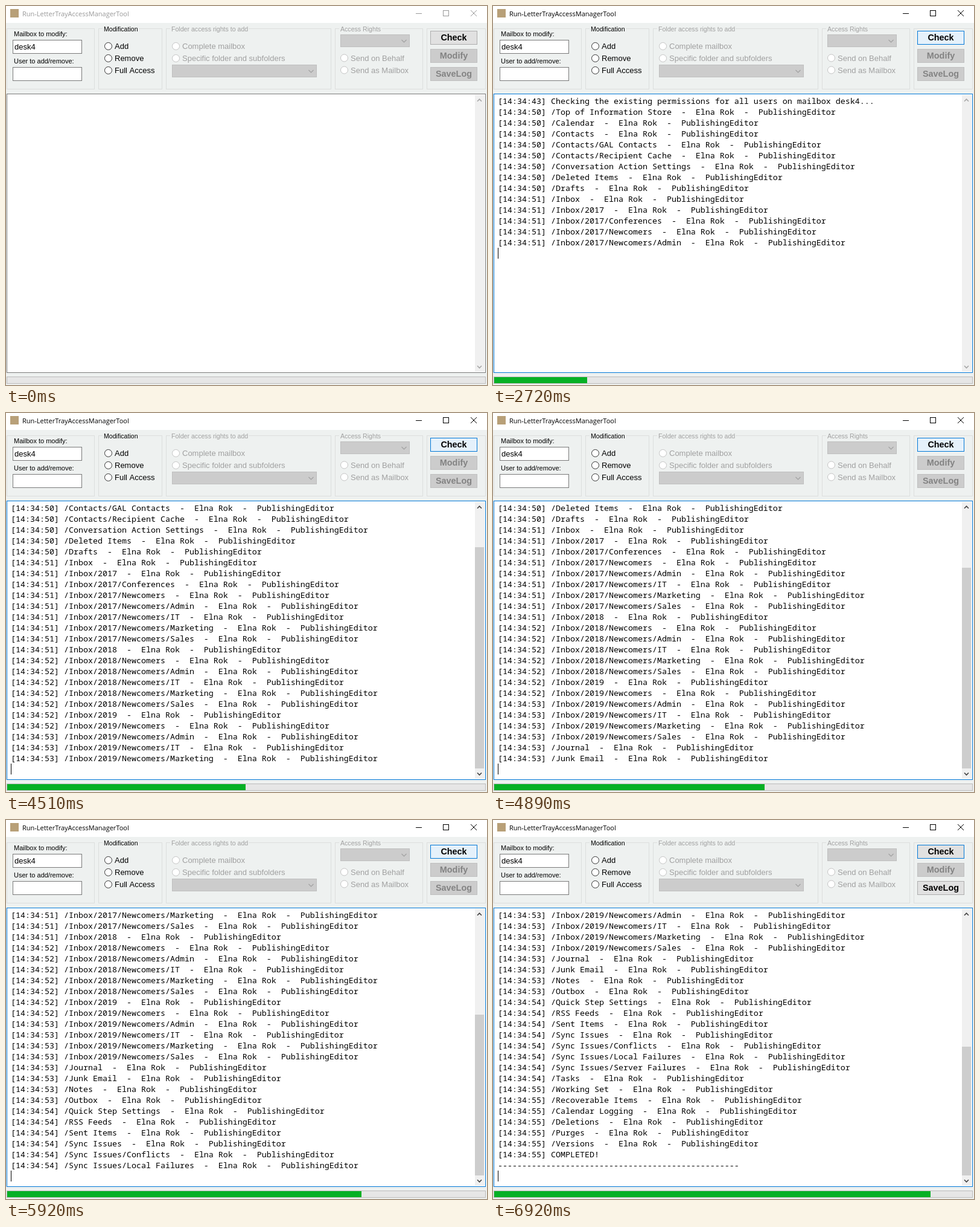
Animation, 797 px wide and 627 px high, one loop 7 s. Source, as an HTML page with a canvas:

```html
<!DOCTYPE html>
<html lang="en">
<head>
<meta charset="utf-8">
<title>Mailbox permissions</title>
<style>
html, body { margin: 0; width: 100%; height: 100%; overflow: hidden; background: #eef1f0; }
canvas { display: block; }
</style>
</head>
<body>
<canvas id="stage" width="797" height="627"></canvas>
<script>
const ctx = document.getElementById('stage').getContext('2d', { alpha: false });
const LOOP = 7000;
const BACK = '#eef1f0', BLUE = '#0078d7', DIM = '#a0a0a0';
const SANS = '"Liberation Sans", Arial, sans-serif';
const LABEL = '11px ' + SANS, GROUP = '10.6px ' + SANS, BODY = '13px ' + SANS;
const BUTTON = 'bold 14.4px ' + SANS;
const TITLE = '11px "Open Sans", "Noto Sans", sans-serif';
const MONO = '13.333px "Noto Sans Mono", "DejaVu Sans Mono", monospace';
const ROW = 18, TOP = 148, ROWS = 25;

// Log contents
const folders = ['Top of Information Store', 'Calendar', 'Contacts', 'Contacts/GAL Contacts',
  'Contacts/Recipient Cache', 'Conversation Action Settings', 'Deleted Items', 'Drafts', 'Inbox'];
for (const year of [2017, 2018, 2019]) {
  const base = 'Inbox/' + year;
  folders.push(base);
  if (year === 2017) folders.push(base + '/Conferences');
  folders.push(base + '/Newcomers');
  for (const team of ['Admin', 'IT', 'Marketing', 'Sales']) folders.push(base + '/Newcomers/' + team);
}
folders.push('Journal', 'Junk Email', 'Notes', 'Outbox', 'Quick Step Settings', 'RSS Feeds',
  'Sent Items', 'Sync Issues', 'Sync Issues/Conflicts', 'Sync Issues/Local Failures',
  'Sync Issues/Server Failures', 'Tasks', 'Working Set', 'Recoverable Items',
  'Calendar Logging', 'Deletions', 'Purges', 'Versions');

const secondStarts = [9, 18, 25, 33, 41];
const stamp = i => `[14:34:${i ? 50 + secondStarts.filter(s => i >= s).length : 43}] `;
const lines = [
  'Checking the existing permissions for all users on mailbox desk4...',
  ...folders.map(f => `/${f}  -  Elna Rok  -  PublishingEditor`),
  'COMPLETED!'
].map((text, i) => stamp(i) + text);
lines.push('-'.repeat(50));

// When each log line arrives
const arrivals = [710, 1240, 1390, 1560, 1640, 1790, 1860, 2030, 2110, 2260, 2340, 2490, 2570,
  2720, 2800, 2950, 3030, 3180, 3260, 3410, 3580, 3650, 3810, 3960, 4110, 4190, 4340, 4510,
  4590, 4740, 4890, 5060, 5130, 5300, 5370, 5540, 5620, 5770, 5920, 6000, 6150, 6310, 6460,
  6540, 6690, 6770, 6920, 6920, 6920];
// Repaints in which only the progress bar moves
const repaints = [1710, 1950, 2180, 2420, 3730, 4270, 4820, 6230, 6380];
const ticks = [...arrivals, ...repaints].sort((a, b) => a - b);
const barKeys = [[1610, 2], [1860, 35], [3580, 276], [4510, 397], [5370, 518], [6310, 639], [6920, 725]];

function barEnd(t) {
  const now = ticks.filter(k => k <= t).pop() || 0;
  if (now <= barKeys[0][0]) return 2;
  for (let i = 1; i < barKeys.length; i++) {
    const [t0, x0] = barKeys[i - 1], [t1, x1] = barKeys[i];
    if (now <= t1) return Math.round(x0 + (x1 - x0) * (now - t0) / (t1 - t0));
  }
  return 725;
}

function rect(x, y, w, h, color) {
  ctx.fillStyle = color;
  ctx.fillRect(x, y, w, h);
}

function box(x, y, w, h, fill, border) {
  rect(x, y, w, h, border);
  rect(x + 1, y + 1, w - 2, h - 2, fill);
}

function text(str, x, y, font, color = '#000', align = 'left') {
  ctx.font = font;
  ctx.fillStyle = color;
  ctx.textAlign = align;
  ctx.fillText(str, x, y);
}

function path(points, color, width = 1) {
  ctx.beginPath();
  points.forEach(([x, y], i) => i ? ctx.lineTo(x, y) : ctx.moveTo(x, y));
  ctx.strokeStyle = color;
  ctx.lineWidth = width;
  ctx.stroke();
}

// dir 1 points down, -1 points up
function chevron(x, y, size, dir, color, width) {
  path([[x - size, y - dir * size / 2], [x, y + dir * size / 2], [x + size, y - dir * size / 2]], color, width);
}

function group(x, w, title, gap, color) {
  box(x, 37, w, 101, BACK, '#dcdedd');
  if (!title) return;
  rect(x + 7, 37, gap, 1, BACK);
  text(title, x + 9, 42, GROUP, color);
}

function radio(x, y, label, on) {
  ctx.beginPath();
  ctx.arc(x, y, 6, 0, Math.PI * 2);
  ctx.fillStyle = '#fff';
  ctx.fill();
  ctx.strokeStyle = on ? '#333' : '#c4c4c4';
  ctx.lineWidth = 1;
  ctx.stroke();
  text(label, x + 10.5, y + 4.5, BODY, on ? '#000' : DIM);
}

function combo(x, y, w) {
  box(x, y, w, 21, '#ccc', '#bfbfbf');
  chevron(x + w - 9.5, y + 11, 4, 1, DIM, 1.1);
}

function button(y, label, fill, border, color) {
  box(703, y, 78, 23, fill, border);
  text(label, 742, y + 16, BUTTON, color, 'center');
}

const mix = (a, b, p) => `rgb(${a.map((v, i) => Math.round(v + (b[i] - v) * p))})`;

function checkLook(t) {
  if (t >= 6920) return ['#e1e1e1', BLUE];
  if (t >= 380 && t < 460) return ['#cce4f7', '#005499'];
  const p = [80, 160, 230, 310].filter(k => k <= t).length / 4;
  return [mix([225, 225, 225], [229, 241, 251], p), mix([173, 173, 173], [0, 120, 215], p)];
}

function titleBar(active) {
  const color = active ? '#000' : '#999';
  rect(0, 0, 797, 28, '#fff');
  rect(7, 5, 14, 14, '#b8a078');
  text('Run-LetterTrayAccessManagerTool', 27, 17, TITLE, color);
  rect(679, 12, 10, 1, color);
  box(724, 7, 10, 10, '#fff', color);
  path([[770, 7], [780, 17]], color);
  path([[780, 7], [770, 17]], color);
}

function form(t) {
  group(1, 146);
  text('Mailbox to modify:', 13, 50, LABEL);
  box(11, 56, 115, 23, '#fff', '#7a7a7a');
  text('desk4', 14, 72, BODY);
  text('User to add/remove:', 13, 95, LABEL);
  box(11, 101, 115, 23, '#fff', '#7a7a7a');

  group(153, 106, 'Modification', 60, '#000');
  ['Add', 'Remove', 'Full Access'].forEach((s, i) => radio(169.5, 66.5 + 20 * i, s, true));

  group(265, 274, 'Folder access rights to add', 130, DIM);
  radio(281.5, 66.5, 'Complete mailbox');
  radio(281.5, 86.5, 'Specific folder and subfolders');
  combo(275, 97, 240);

  group(545, 146, 'Access Rights', 71, DIM);
  combo(554, 47, 115);
  radio(560.5, 86, 'Send on Behalf');
  radio(560.5, 106, 'Send as Mailbox');

  group(697, 98);
  button(41, 'Check', ...checkLook(t), '#000');
  button(71, 'Modify', '#ccc', '#bfbfbf', '#838383');
  if (t >= 6920) button(101, 'SaveLog', '#e1e1e1', '#adadad', '#000');
  else button(101, 'SaveLog', '#ccc', '#bfbfbf', '#838383');
}

function log(t) {
  const count = arrivals.filter(k => k <= t).length;
  const first = Math.max(0, count + 1 - ROWS);
  box(1, 145, 794, 462, '#fff', t >= 710 ? BLUE : '#7a7a7a');

  for (let i = first; i < count; i++) text(lines[i], 8, TOP + (i - first) * ROW + 14, MONO);
  const blinkOff = t >= 1090 && t < 1240;
  if (count && !blinkOff) rect(8, TOP + (count - first) * ROW, 1, ROW, '#000');

  rect(777, 147, 16, 458, '#f0f0f0');
  const arrow = first ? '#404040' : '#a6a6a6';
  chevron(784.5, 156, 3.5, -1, arrow, 1.6);
  chevron(784.5, 597, 3.5, 1, arrow, 1.6);
  if (first) {
    const h = Math.round(425 * ROWS / (count + 1));
    rect(777, 588 - h, 15, h, '#cdcdcd');
  }
}

function pointer(x, y) {
  const shape = [[0, 0], [0, 16], [4, 12.5], [6.5, 18], [9, 17], [6.5, 11.5], [11, 11.5]];
  ctx.beginPath();
  shape.forEach(([dx, dy]) => ctx.lineTo(x + 0.5 + dx, y + 0.5 + dy));
  ctx.closePath();
  ctx.fillStyle = '#fff';
  ctx.fill();
  ctx.strokeStyle = '#000';
  ctx.lineWidth = 1;
  ctx.stroke();
}

function draw(t) {
  rect(0, 0, 797, 627, BACK);
  titleBar(t >= 80);
  form(t);
  log(t);
  box(1, 613, 794, 12, '#e6e6e6', '#bcbcbc');
  rect(2, 614, barEnd(t) - 2, 10, '#06b025');
  if (t >= 80 && t < 1010) pointer(742, 48);
}

const start = performance.now();
function frame() {
  draw((performance.now() - start) % LOOP);
  requestAnimationFrame(frame);
}
frame();
</script>
</body>
</html>
```
